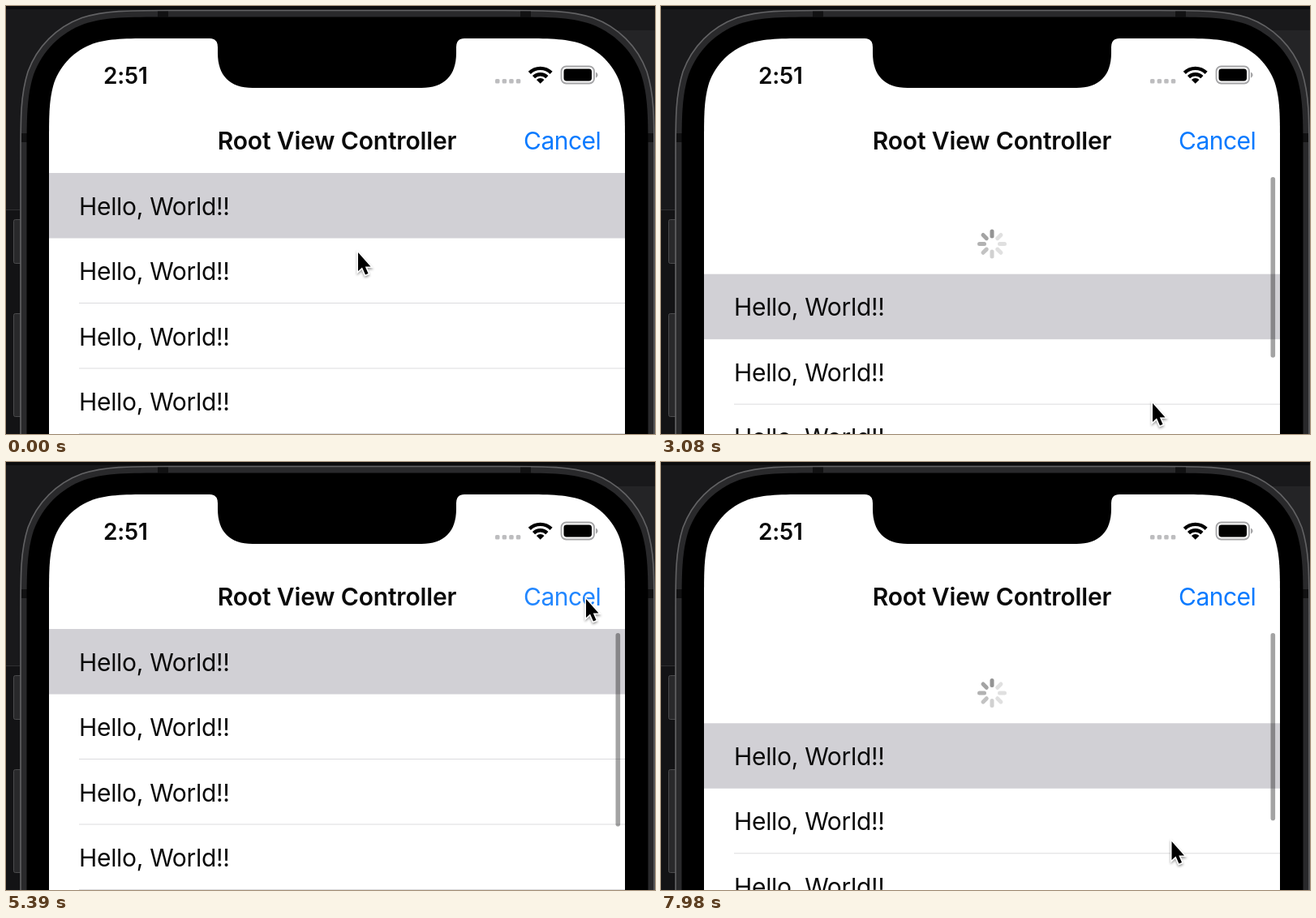
Animation of 800 by 528 pixels, one loop 8 s. Source, as an HTML page:

```html
<!DOCTYPE html>
<html>
<head>
<meta charset="utf-8">
<style>
html, body { margin: 0; width: 100%; height: 100%; overflow: hidden; background: #19191b; }
svg { display: block; width: 800px; height: 528px; }
text { font-family: Inter, "Liberation Sans", sans-serif; font-size: 30px; letter-spacing: -.32px; fill: #0a0a0a; }
.bold { font-weight: 600; letter-spacing: -.16px; }
</style>
</head>
<body>
<svg viewBox="0 0 800 528">
  <defs>
    <clipPath id="screen"><path id="glass"/></clipPath>
    <filter id="shadow" x="-50%" y="-50%" width="200%" height="200%">
      <feDropShadow dx="0" dy="2" stdDeviation="1.6" flood-opacity=".4"/>
    </filter>
  </defs>

  <!-- desktop and phone body -->
  <path d="M0 0H800V4H0Z" fill="#0c0c0d"/>
  <path d="M0 252H17V528H0Z" fill="#131315"/>
  <path d="M700 30H800V250H700Z" fill="#242426"/>
  <path d="M0 251.5H17" stroke="#303032"/>
  <g fill="#29292b" stroke="#4b4b4d">
    <rect x="9.5" y="263.5" width="12" height="54" rx="2"/>
    <rect x="9.5" y="379.5" width="12" height="127" rx="2"/>
  </g>
  <path id="body" fill="#29292b" stroke="#626264" stroke-width="1.6"/>
  <path d="M187 6.5h13v7h-13zM634 6.5h13v7h-13zM19 157h7v11h-7zM791 157h7v11h-7z" fill="#111112"/>
  <path id="bezel"/>

  <g clip-path="url(#screen)">
    <rect x="50" y="30" width="720" height="498" fill="#fff"/>
    <g id="rows"></g>
    <text class="bold" x="408" y="177" text-anchor="middle">Root View Controller</text>
    <text id="cancel" x="638" y="177" style="fill:#0a7aff;letter-spacing:-.5px">Cancel</text>
    <path id="arrow" d="M0-14V13M-11 3L0 14L11 3" fill="none" stroke="#878787" stroke-width="4.4"/>
    <g id="spinner" stroke="#000" stroke-width="5" stroke-linecap="round"></g>
    <rect id="thumb" x="751.5" y="211" width="5.6" rx="2.8" fill-opacity=".36"/>
    <path d="M245 30V40H251Q261 40 261 51V58C261 86 276 101 304 101H512C540 101 555 86 555 58V51Q555 40 565 40H571V30Z"/>
  </g>

  <!-- status bar -->
  <text class="bold" x="120" y="95.5" style="font-size:28px">2:51</text>
  <g id="dots" fill="#bdbdbf"></g>
  <g transform="translate(658.7 95.8)">
    <path d="M0 0L-4.8-4.8A6.8 6.8 0 0 1 4.8-4.8Z"/>
    <path d="M-8.2-8.2A11.6 11.6 0 0 1 8.2-8.2M-13.4-13.4A19 19 0 0 1 13.4-13.4" fill="none" stroke="#000" stroke-width="4.4"/>
  </g>
  <rect x="684.5" y="74.5" width="40.5" height="21" rx="6" fill="none" stroke="#a5a5a7" stroke-width="1.8"/>
  <rect x="687.5" y="77.5" width="34.5" height="15" rx="3.4"/>
  <path d="M727 81.5q2.6 1 2.6 3.6t-2.6 3.6z" fill="#a5a5a7"/>

  <path id="cursor" d="M1 2V25L6 20.5L10 29.5L13.5 28L9.8 19.5H16.5Z" stroke="#fff" stroke-width="2.8" paint-order="stroke" filter="url(#shadow)"/>
</svg>
<script>
const $ = id => document.getElementById(id);
const LOOP = 8000, TOP = 206, ROW = 80.5;
const REST = 109, OVERSHOOT = 18, SETTLE = 430, LAG = 50;

const drags = [
  { start: 2382, end: 3022, spin: 2995 },
  { start: 6180, end: 7592, spin: 7130 }
];
const release = { start: 5080, end: 5360 };
const home = { x: 433, y: 302 };
const legs = [
  { start: 300, end: 1700, x: 612, y: 360 },
  { ...drags[0], x: 605, y: 488 },
  { start: 4500, end: 5000, x: 714, y: 167 },
  { start: 5500, end: 6100, x: 633, y: 353 },
  { ...drags[1], x: 628.5, y: 466 }
];

const ramp = (t, a, b) => Math.max(0, Math.min(1, (t - a) / (b - a)));
const ease = (t, { start, end }) => {
  const u = ramp(t, start, end);
  return u * u * (3 - 2 * u);
};
const move = (id, x, y) => $(id).setAttribute('transform', `translate(${x} ${y})`);
const repeat = (n, f) => Array.from({ length: n }, (_, i) => f(i)).join('');

// open-bottomed panel with continuous-curvature top corners
function panel(l, r, t, k) {
  const corner = (x, s) => {
    const p = (a, b) => `${x + s * a * k} ${t + b * k} `;
    return s > 0
      ? 'M' + p(0, 9) + 'L' + p(0, 1.53) + 'C' + p(0, 1.09) + p(0, .87) + p(.075, .63)
        + 'C' + p(.17, .37) + p(.37, .17) + p(.63, .075) + 'C' + p(.87, 0) + p(1.09, 0) + p(1.53, 0)
      : 'L' + p(1.53, 0) + 'C' + p(1.09, 0) + p(.87, 0) + p(.63, .075)
        + 'C' + p(.37, .17) + p(.17, .37) + p(.075, .63) + 'C' + p(0, .87) + p(0, 1.09) + p(0, 1.53) + 'L' + p(0, 9);
  };
  return corner(l, 1) + corner(r, -1) + 'Z';
}
$('body').setAttribute('d', panel(18, 799, 5.5, 120));
$('bezel').setAttribute('d', panel(25.5, 791.5, 13.5, 113));
$('glass').setAttribute('d', panel(53, 763, 40, 86));

$('rows').innerHTML = `<rect x="53" y="${TOP}" width="710" height="${ROW}" fill="#d1d0d5"/>`
  + repeat(4, i => `<text x="90" y="${TOP + ROW * i + 51.5}">Hello, World!!</text>`)
  + repeat(3, i => `<path d="M90 ${TOP + ROW * (i + 2) - .5}H763" stroke="#dcdcde"/>`);
$('spinner').innerHTML = repeat(8, i => `<path d="M0-9.5V-15.5" transform="rotate(${i * 45})"/>`);
$('dots').innerHTML = repeat(4, i => `<rect x="${603 + i * 8.6}" y="90" width="5.5" height="5.5" rx="1.6"/>`);

// pull down, settle on the refresh inset, spring back on release
function offset(t) {
  const drag = t < drags[1].start ? drags[0] : drags[1];
  const over = OVERSHOOT * Math.exp(-Math.max(0, t - drag.end) / SETTLE);
  const back = drag === drags[0] ? 1 - ease(t, release) : 1;
  return (REST + over) * ease(t, drag) * back;
}

function draw(t) {
  const off = offset(t);
  const drag = drags.find(d => t > (d.start + d.end) / 2 && !(d === drags[0] && t > release.start));
  const closing = t > release.start && t < release.end;
  move('rows', 0, off);

  let { x, y } = home;
  for (const leg of legs) {
    const u = ease(t, leg);
    x += (leg.x - x) * u;
    y += (leg.y - y) * u;
  }
  move('cursor', x, y);

  move('arrow', 408, TOP - 37 + offset(t - LAG));
  $('arrow').style.opacity = drag || closing ? 0 : ramp(off, 0, 12);

  move('spinner', 408, TOP - 37.3 + off);
  $('spinner').style.opacity = drag ? 1 : 0;
  if (drag) {
    const head = Math.floor((t - drag.spin) / 100);
    [...$('spinner').children].forEach((spoke, i) => {
      const age = (head - i + 80) % 8;
      spoke.style.strokeOpacity = Math.max(.12, .42 - age * .06);
    });
  }

  const excess = closing ? 0 : drag ? off - REST : off;
  $('thumb').setAttribute('height', 238.5 - Math.max(0, Math.min(22, excess)));
  $('thumb').style.opacity = ramp(t, 2300, 2400) - ramp(t, 5900, 6150) + ramp(t, 6200, 6300);

  $('cancel').style.opacity = t < release.start ? 1 : .3 + .7 * ramp(t, release.start, 5440);
}

function tick() {
  draw(performance.now() % LOOP);
  requestAnimationFrame(tick);
}
tick();
</script>
</body>
</html>
```
